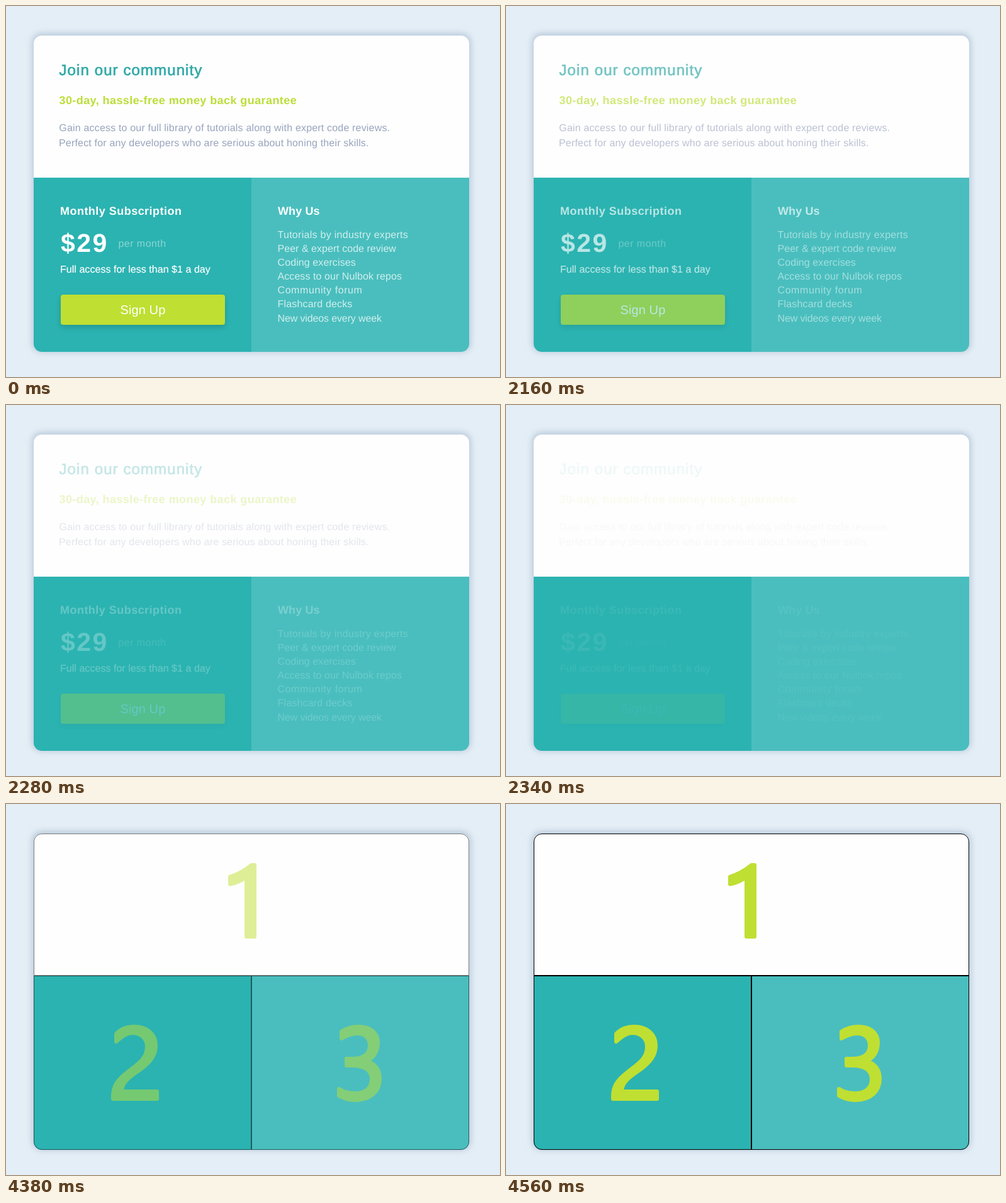
These frames come from a looping animation (785 px wide and 590 px high, 7560 ms). An HTML page:

```html
<!DOCTYPE html>
<html lang="en">
<head>
<meta charset="utf-8">
<title>Pricing card</title>
<style>
html, body { margin: 0; width: 100%; height: 100%; overflow: hidden; background: #e4eef6; }
svg { display: block; width: 785px; height: 590px; }
text { font-family: "Liberation Sans", Arial, sans-serif; font-size: 16px; text-rendering: geometricPrecision; }
</style>
</head>
<body>
<svg viewBox="0 0 785 590" xmlns="http://www.w3.org/2000/svg">
  <defs>
    <clipPath id="card"><rect x="44" y="47" width="692" height="503" rx="13"/></clipPath>
    <filter id="soft" x="-10%" y="-10%" width="120%" height="120%"><feGaussianBlur stdDeviation="5.5"/></filter>
    <filter id="lift" x="-20%" y="-60%" width="140%" height="220%"><feGaussianBlur stdDeviation="5"/></filter>
  </defs>

  <rect width="785" height="590" fill="#e4eef6"/>
  <rect x="42" y="44" width="696" height="506" rx="14" fill="#b4c5d7" filter="url(#soft)"/>
  <g clip-path="url(#card)">
    <rect x="44" y="47" width="692" height="227" fill="#fefefe"/>
    <rect x="44" y="273" width="346" height="277" fill="#2bb3b1"/>
    <rect x="390" y="273" width="346" height="277" fill="#4abebe"/>
  </g>

  <g id="copy">
    <rect x="87" y="463" width="261" height="48" rx="4" fill="#000" opacity=".16" filter="url(#lift)"/>
    <rect x="87" y="459" width="261" height="48" rx="4" fill="#bfdf32"/>
  </g>

  <g id="plan" opacity="0">
    <g fill="none" stroke="#000">
      <rect x="44.5" y="47.5" width="691" height="502" rx="12.5"/>
      <path d="M44 273H736M390 273V550" stroke-width="2"/>
    </g>
    <g fill="#bfdf32" stroke="#bfdf32" stroke-width="6" stroke-linejoin="round">
      <path d="M395 97H390Q374 110 356 115.5V127.5Q370 125 382 116V211H395Z"/>
      <path d="M170 469V464C170 448 178 438 192 427C210 413 224 405 224 386C224 373 215 365 202 364C191 364 183 371 175 378V365.5C182 358 192 354 204 354C224 354 238 366 238 384C238 400 229 411 214 422C198 433 184 442 184 457H240V469Z"/>
      <path d="M529 464V453C537 459 547 460 555 460C570 460 581 452 581 438C581 424 570 416 550 416H541V405H549C567 405 578 398 578 384C578 371 569 365 558 365C548 365 540 369 533 373V362C540 357 549 354 560 354C578 354 591 363 591 379C591 395 583 405 572 409C586 412 594 422 594 437C594 457 579 471 555 471C545 471 536 468 529 464Z"/>
    </g>
  </g>
</svg>
<script>
const copy = document.getElementById('copy');
const plan = document.getElementById('plan');

function label(x, y, str, spacing, attrs) {
  const el = document.createElementNS('http://www.w3.org/2000/svg', 'text');
  const all = { x, y, fill: '#fff', ...attrs };
  for (const key in all) el.setAttribute(key, all[key]);
  el.style.letterSpacing = spacing + 'px';
  if (all.size) el.style.fontSize = all.size + 'px';
  el.textContent = str;
  copy.append(el);
}

const bold = { size: 18, 'font-weight': 700 };
const grey = { fill: '#98a4bd' };

label(84.5, 109.5, 'Join our community', 1.1, { size: 24, fill: '#31a9a8', stroke: '#31a9a8', 'stroke-width': .7 });
label(84.5, 156, '30-day, hassle-free money back guarantee', .42, { ...bold, fill: '#bbde38' });
label(84.3, 198.5, 'Gain access to our full library of tutorials along with expert code reviews.', .18, grey);
label(84, 222.5, 'Perfect for any developers who are serious about honing their skills.', .18, grey);

label(86, 332, 'Monthly Subscription', .47, bold);
label(87, 391, '$29', 2.4, { ...bold, size: 41 });
label(178.5, 382.5, 'per month', .45, { 'fill-opacity': .45 });
label(86, 423.5, 'Full access for less than $1 a day', .04, { stroke: '#fff', 'stroke-width': .2 });
label(181.5, 489.5, 'Sign Up', .1, { size: 20 });

label(432, 332, 'Why Us', .1, bold);
[
  ['Tutorials by industry experts', .28],
  ['Peer & expert code review', .03],
  ['Coding exercises', .1],
  ['Access to our Nulbok repos', .07],
  ['Community forum', .58],
  ['Flashcard decks', .17],
  ['New videos every week', -.13]
].forEach(([str, spacing], i) => label(431.5, 368.5 + i * 22.17, str, spacing, { 'fill-opacity': .75 }));

const LOOP = 7560, STEP = 60, OUT = 2040, IN = 4260;
const steps = (t, from) => Math.floor((t - from) / STEP);

function draw(t) {
  let text = 1, grid = 0;
  if (t >= IN) {
    text = 0;
    grid = Math.min(1, .1 + .2 * steps(t, IN));
  } else if (t >= OUT) {
    // the fade stops just short of clear and rests there
    text = Math.max(.07, Math.min(1, 1.07 - .2 * steps(t, OUT)));
  }
  copy.setAttribute('opacity', text);
  plan.setAttribute('opacity', grid);
}

const start = performance.now();
function tick() {
  draw((performance.now() - start) % LOOP);
  requestAnimationFrame(tick);
}
tick();
</script>
</body>
</html>
```
